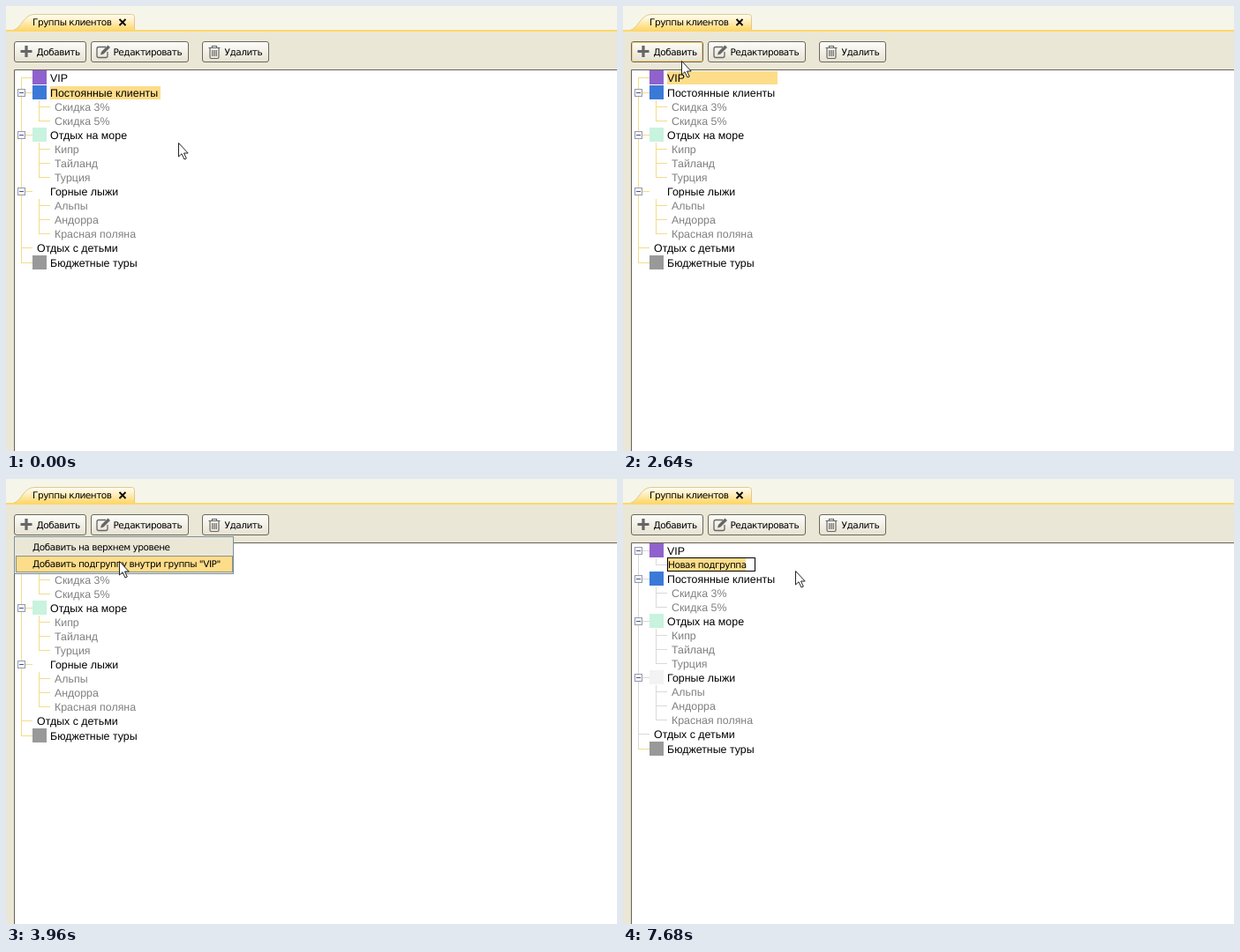
Animation, 692 px wide and 505 px high, one loop 8 s. Source, as an HTML page:

```html
<!DOCTYPE html>
<html lang="ru">
<head>
<meta charset="utf-8">
<style>
html, body { margin: 0; width: 100%; height: 100%; overflow: hidden; background: #ebe7d7; }
svg { display: block; }
text { text-rendering: geometricPrecision; white-space: pre; }
.ui { font: 10.5px "DejaVu Sans", sans-serif; letter-spacing: -.47px; }
.tree { font: 12.4px "Liberation Sans", Arial, sans-serif; }
</style>
</head>
<body>
<svg width="692" height="505" viewBox="0 0 692 505">
  <defs>
    <linearGradient id="tabFill" x2="0" y2="1">
      <stop offset="0" stop-color="#fffdf5"/><stop offset=".4" stop-color="#fff0c4"/><stop offset="1" stop-color="#ffd768"/>
    </linearGradient>
    <linearGradient id="btnFill" x2="0" y2="1">
      <stop offset="0" stop-color="#fdfdfa"/><stop offset="1" stop-color="#e6e2d2"/>
    </linearGradient>
  </defs>
  <rect width="692" height="27" fill="#f6f5ea"/>
  <path d="M8 27.5C17 26 20 9.5 32 9.5H142.5Q145.5 9.5 145.5 12.5V27.5Z" fill="url(#tabFill)" stroke="#dfc98f"/>
  <rect y="27" width="692" height="2" fill="#ffd768"/>
  <text class="ui" x="30" y="22">Группы клиентов</text>
  <path d="M128.5 15l7 7m0-7l-7 7" stroke="#000" stroke-width="1.8"/>
  <g id="buttons"></g>
  <rect x="9" y="72" width="683" height="433" fill="#fff"/>
  <path d="M9.5 505V72.5H692" fill="none" stroke="#666258"/>
  <g id="tree"></g>
  <g id="menu"></g>
  <g id="pointer">
    <circle id="ring" cy="1" r="9.7" fill="none" stroke="#222" stroke-width="1.2"/>
    <path d="M.5.5V16L4 12.7L7 19L9.3 18L6.5 12H11.2Z" fill="#fff" stroke="#222"/>
  </g>
</svg>
<script>
const LOOP = 8000, GRAY = '#d9d9d9', GOLD = '#f3dc8c', PICK = '#fddd89';
const $ = id => document.getElementById(id);
const rect = (x, y, w, h, fill, more = '') =>
  `<rect x="${x}" y="${y}" width="${w}" height="${h}" fill="${fill}" ${more}/>`;
const box = (x, y, w, h, fill, edge, more = '') =>
  rect(x + .5, y + .5, w - 1, h - 1, fill, `stroke="${edge}" ${more}`);
const label = (cls, x, y, s, fill = '#000') =>
  `<text class="${cls}" x="${x}" y="${y}" fill="${fill}">${s}</text>`;
const across = (x, y, w, c) => rect(x, y, w, 1, c);
const down = (x, y, h, c) => rect(x, y, 1, h, c);

const plus = '<path d="M16.5 51.5h13M23 45v13" stroke="#666" stroke-width="3.2"/>';
const pencil = `<path d="M113 46.5H105Q103 46.5 103 48.5V56.5Q103 58.5 105 58.5H113Q115 58.5 115 56.5V52" fill="none" stroke="#666" stroke-width="1.3"/>
  <path d="M107 55.5l1-3.5 7.5-7.5 2.5 2.5-7.5 7.5z" fill="#666"/>`;
const bin = '<path d="M229.5 47.5h13M233.5 47v-1.5h5v1.5M231 48v10q0 1.5 1.5 1.5h7q1.5 0 1.5-1.5v-10M233.8 50v7M236 50v7M238.2 50v7" fill="none" stroke="#666" stroke-width="1.2"/>';

const button = (x, w, icon, s, hot) =>
  box(x, 40, w, 24, 'url(#btnFill)', '#6b675c', 'rx="2.5"') +
  (hot ? box(x + 1, 41, w - 2, 22, 'none', '#f2cb6c', 'rx="1.5"') : '') +
  icon + label('ui', x + 25.5, 56, s);

const buttons = hot =>
  button(9, 82, plus, 'Добавить', hot) +
  button(96, 111, pencil, 'Редактировать') +
  button(222, 76, bin, 'Удалить');

const groups = [
  ['VIP', '#8f62cd'],
  ['Постоянные клиенты', '#3b79d8', 'Скидка 3%', 'Скидка 5%'],
  ['Отдых на море', '#c8f3de', 'Кипр', 'Тайланд', 'Турция'],
  ['Горные лыжи', '#f3f3f3', 'Альпы', 'Андорра', 'Красная поляна'],
  ['Отдых с детьми', ''],
  ['Бюджетные туры', '#999']
];

const expander = y => box(13, y - 4, 9, 9, '#f8f8fa', '#969aa8') + across(15, y, 5, '#4455a0');

const editor = (y, caret) =>
  box(50, y - 8, 100, 16, '#fff', '#000') + rect(51, y - 7, 88, 14, PICK) +
  label('ui', 51, y + 4, 'Новая подгруппа') + (caret ? down(139, y - 7, 14, '#000') : '');

function tree({ added, picked, caret }) {
  const line = added ? GRAY : GOLD;
  let y = 65, out = '', leaf = false;
  for (const [name, color, ...names] of groups) {
    const kids = added && name === 'VIP' ? [''] : names;
    y += leaf && color ? 17 : 16;
    leaf = !kids.length;
    out += across(17, y, 13, name === groups.at(-1)[0] ? GOLD : line);
    if (!leaf) out += expander(y) + down(37, y + 9, 16 * kids.length - 8, line);
    if (color && (added || name !== 'Горные лыжи')) out += rect(30, y - 8, 16, 16, color);
    if (!added && picked === name) out += rect(50, y - 7, 125, 15, PICK);
    out += label('tree', color ? 50 : 35, y + 5, name);
    for (const kid of kids) {
      y += 16;
      out += across(37, y, 13, line) + (kid ? label('tree', 55, y + 5, kid, '#808080') : editor(y, caret));
    }
  }
  return down(17, 81, y - 80, line) + out;
}

function menu(open, hot) {
  if (!open) return '';
  const items = ['Добавить на верхнем уровене', 'Добавить подгруппу внутри группы "VIP"'];
  return box(9, 65, 249, 43, '#ebe7d7', '#7d909c') + items.map((s, i) =>
    (i === hot ? box(11, 68 + 19 * i, 246, 19, PICK, '#8b9190') : '') +
    label('ui', 30, 81 + 19 * i, s)).join('');
}

// Cursor stops: time, x, y
const stops = [[0, 195, 155], [300, 195, 155], [1930, 62, 78], [2350, 62, 80], [2790, 68, 53], [3400, 68, 55],
  [3960, 125, 93], [4500, 188, 100], [5100, 188, 100], [5350, 194, 102], [6140, 195, 104], [LOOP, 195, 104]];

function cursorAt(time) {
  const t = Math.min(LOOP, Math.max(0, 430 + 148 * Math.round((time - 430) / 148)));
  const i = Math.max(1, stops.findIndex(s => s[0] >= t));
  const [a, x, y] = stops[i - 1], [b, u, v] = stops[i];
  const k = (t - a) / (b - a);
  return [Math.round(x + (u - x) * k), Math.round(y + (v - y) * k)];
}

const between = (t, a, b) => t >= a && t < b;
const cache = {};
function put(id, html) {
  if (cache[id] !== html) $(id).innerHTML = cache[id] = html;
}

function draw(t) {
  const [x, y] = cursorAt(t);
  put('buttons', buttons(between(t, 2640, 3710)));
  put('tree', tree({
    added: t >= 5235,
    picked: groups[t < 2210 ? 1 : 0][0],
    caret: t >= 5370 && Math.floor((t - 5670) / 500) % 2 !== 0
  }));
  put('menu', menu(between(t, 2940, 5100), Math.floor((y - 68) / 19)));
  const click = [2070, 2790, 4800].some(c => between(t, c, c + 290));
  $('ring').style.display = click ? '' : 'none';
  $('pointer').setAttribute('transform', `translate(${x} ${y})`);
}

function frame(now) {
  draw(now % LOOP);
  requestAnimationFrame(frame);
}
draw(0);
requestAnimationFrame(frame);
</script>
</body>
</html>
```
